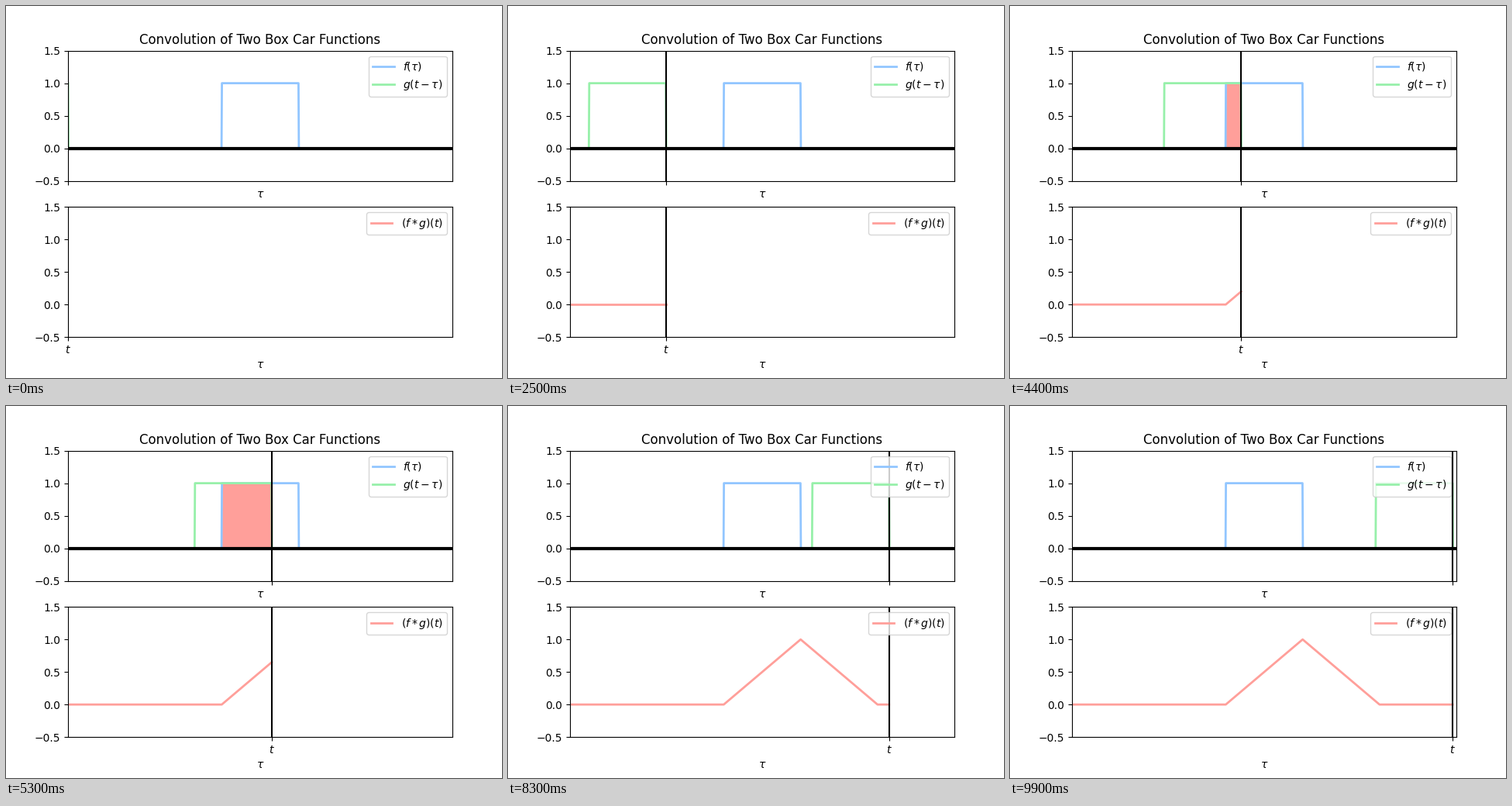
Recreate the animation shown at these times as a matplotlib script. Size 640x480 px, loop 10000 ms.

```python
import matplotlib.pyplot as plt
import numpy as np
from matplotlib.animation import FuncAnimation

BLUE, GREEN, RED = "#92C6FF", "#97F0AA", "#FF9F9A"
FRAMES = 100
LO, HI = -2.5, 2.5

tau = np.linspace(LO, HI, 1000)
times = np.linspace(LO, HI, FRAMES, endpoint=False)


def f(x):
    return np.where(np.abs(x) <= 0.5, 1.0, 0.0)


def g(x):
    return np.where((x >= 0) & (x <= 1), 1.0, 0.0)


# Overlap of two unit boxes: a triangle peaking at t = 0.5
conv = np.clip(1 - np.abs(times - 0.5), 0, None)

fig, (top, bottom) = plt.subplots(2, 1, sharex=True, figsize=(6.4, 4.8), dpi=100)
for ax in (top, bottom):
    ax.set(xlim=(LO, HI), ylim=(-0.5, 1.5), xlabel=r"$\tau$",
           yticks=[-0.5, 0, 0.5, 1, 1.5])
top.set_title("Convolution of Two Box Car Functions")

area, = top.fill(tau, 0 * tau, color=RED, zorder=1)
top.plot(tau, f(tau), color=BLUE, lw=2, label=r"$f(\tau)$")
g_line, = top.plot([], [], color=GREEN, lw=2, label=r"$g(t-\tau)$")
conv_line, = bottom.plot([], [], color=RED, lw=2, label=r"$(f*g)(t)$")
top.axhline(0, color="black", lw=3)
markers = [ax.axvline(LO, color="black", lw=1.5) for ax in (top, bottom)]
for ax in (top, bottom):
    ax.legend(loc="upper right")


def update(i):
    t = times[i]
    shifted = g(t - tau)
    g_line.set_data(tau, shifted)
    area.set_xy(np.column_stack([tau, f(tau) * shifted]))
    conv_line.set_data(times[:i + 1], conv[:i + 1])
    for m in markers:
        m.set_xdata([t, t])
    bottom.set_xticks([t], labels=["$t$"])
    return [g_line, area, conv_line, *markers]


anim = FuncAnimation(fig, update, frames=FRAMES, interval=100,
                     repeat=True, repeat_delay=0, blit=False)
plt.show()
```
